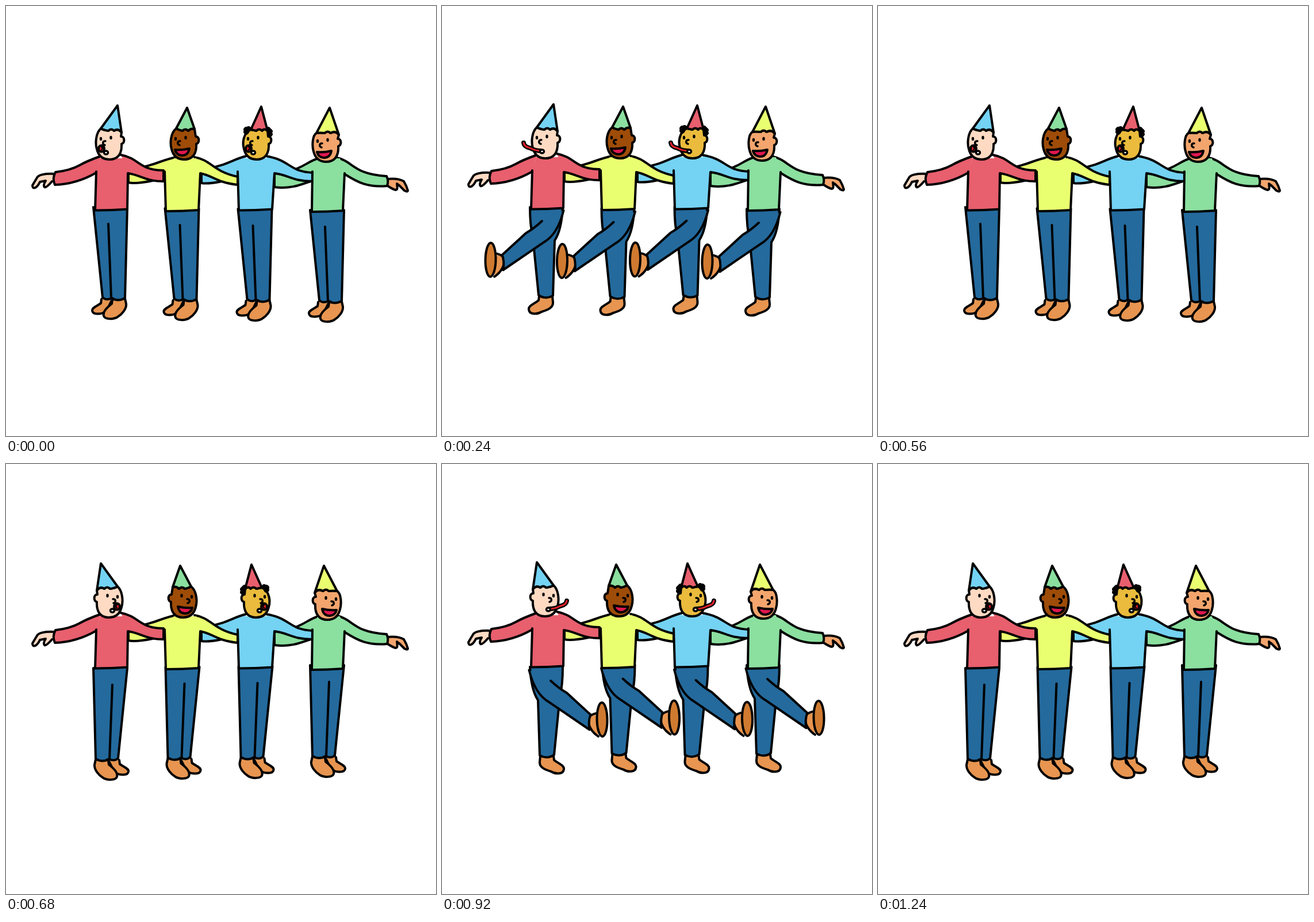
An HTML page that plays this animation: 748 by 748 pixels, repeating every 1.36 s.

```html
<!DOCTYPE html>
<html lang="en">
<head>
<meta charset="utf-8">
<title>Party kick line</title>
<style>
  html, body { margin: 0; width: 100%; height: 100%; overflow: hidden; background: #fff; }
  svg { display: block; width: 100%; height: 100%; }
</style>
</head>
<body>
<svg id="stage" viewBox="0 0 748 748" fill="none" stroke="#000" stroke-width="4" stroke-linecap="round" stroke-linejoin="round"></svg>
<script>
const RED = '#e85f6e', YELLOW = '#eaff70', BLUE = '#74d2f3', GREEN = '#8bdf9f';
const PANTS = '#246a9d', SHOE = '#e79550', SOLE = '#cf7a30';

// trunk: left x at armpit and hem, right x at hem and armpit
// hat: left base, tip and right base, relative to the head centre
// legs: x offset, y offset standing, y offset kicking
const dancers = [
  { shirt: RED, skin: '#ffdac3', hatColor: BLUE, blower: true,
    head: [180, 239], axis: 179.5, hat: [-15, -28, 14, -68, 21, -21],
    trunk: [157, 155, 211, 212], hem: 352.5, neck: [164, 206],
    left: 'M165 259Q140 268 128 275Q112 284 86 287Q80 298 85 309Q122 308 157 288',
    right: 'M200 257C232 263 232 284 274 284V303C242 303 232 291 212 289',
    legs: [0, 0, 0] },
  { shirt: YELLOW, skin: '#9e4c08', hatColor: GREEN,
    head: [310, 239], axis: 309, hat: [-14, -28, 5, -64, 18, -27],
    trunk: [276, 278, 335, 338], hem: 354, neck: [292, 331],
    left: 'M296 261C262 268 262 276 213 282V305Q228 309 276 297',
    right: 'M328 261C358 266 358 285 403 295V309C366 305 360 293 338 289',
    legs: [124.5, 2, 2] },
  { shirt: BLUE, skin: '#eabb3c', hatColor: RED, blower: true, tufts: true,
    head: [436, 239], axis: 435.5, hat: [-10, -26, 8, -66, 19, -24],
    trunk: [403, 405, 463, 467], hem: 352.5, neck: [416, 457],
    left: 'M418 259C390 266 386 276 340 282V306Q358 309 403 296',
    right: 'M452 259C495 266 492 286 533 288V303C498 303 490 291 467 289',
    legs: [251.5, 3, -0.5] },
  { shirt: GREEN, skin: '#f3a56d', hatColor: YELLOW,
    head: [557, 243], axis: 558, hat: [-17, -24, 6, -68, 22, -21],
    trunk: [533, 532, 586, 589], hem: 355, neck: [542, 581],
    left: 'M546 262C518 270 522 282 467 290V313C495 317 515 308 533 302',
    right: 'M576 262C604 268 604 291 662 294Q666 302 663 311C630 314 612 305 590 291',
    legs: [377, 5, 3] }
];

const path = (d, fill = 'none', extra = '') => `<path d="${d}" fill="${fill}" ${extra}/>`;
const group = (transform, content) => `<g transform="${transform}">${content}</g>`;
const dot = (x, y, rx, ry, fill, extra = '') =>
  `<ellipse cx="${x}" cy="${y}" rx="${rx}" ry="${ry}" fill="${fill}" ${extra}/>`;

function standingLegs() {
  return path('M166 510L165 517C158 522 149 525 150 530C151 538 166 536 174 532L184 512', SHOE) +
    path('M185 511L184 518C176 524 168 532 170 539C172 546 188 545 194 541C201 537 210 527 209 518L207 509', SHOE) +
    path('M152 350L168 507Q175 513 184 508Q195 515 207 508L211 350', PANTS) +
    path('M178 379L183 508');
}

function kickingLegs(angle) {
  const support =
    path('M169 505L168 512C161 518 150 521 151 528C152 538 167 536 173 532C183 529 194 525 193 515L192 505', SHOE) +
    path('M153 350Q153 382 158 402L168 503Q180 511 193 504L196 408Q208 390 210 350', PANTS);
  const kicker =
    path('M116 453Q125 453 131 458Q135 478 121 493', SHOE) +
    path('M178 379Q167 396 156 406L125 453Q132 463 133 478L191 413Q210 394 210 352', PANTS) +
    dot(107.5, 466, 9, 29.5, SOLE, 'transform="rotate(-13 107.5 466)"');
  return support + group(`rotate(${angle} 196 360)`, kicker);
}

function trunk({ trunk: [armL, hemL, hemR, armR], hem, neck, shirt, right }) {
  const outline = `M${armL} 286L${hemL} ${hem + 1}Q${(hemL + hemR) / 2} ${hem + 1} ${hemR} ${hem - 1}L${armR} 289`;
  return path(right, shirt) +
    path(`${outline}L${neck[1]} 263H${neck[0]}Z`, shirt, 'stroke="none"') + path(outline);
}

function mouth(blower, kicking) {
  if (!blower) return path('M-16 9Q-4 10 9 7Q7 19 -4 19Q-14 18 -16 9Z', '#e0174f');
  const tube = 'M-8 13Q-17 13 -27 8Q-37 6 -38 -1';
  const toy = kicking
    ? path(tube, 'none', 'stroke-width="8"') + path(tube, 'none', 'stroke="#e3202b" stroke-width="3"')
    : dot(-14, 7, 5, 5.5, '#e3202b') + path('M-14 4Q-10 7 -14 9', 'none', 'stroke-width="2.5"');
  return toy + dot(-6, 14, 3.5, 3, '#fff', 'stroke-width="3.5"');
}

function head(d, mirrored, kicking) {
  const [x1, y1, tipX, tipY, x2, y2] = d.hat, mid = (x1 + x2) / 2;
  const fringe = `Q${x2 - 6} -29 ${mid + 5} -24Q${mid} -29 ${mid - 5} -24Q${x1 + 5} -25 ${x1} ${y1}`;
  const tufts = d.tufts
    ? [[-18, -26], [-14, -27], [-18, -22], [20, -26], [23, -23], [23, -18]]
        .map(([x, y]) => dot(x, y, 4.5, 4.5, '#000', 'stroke-width="1"')).join('') : '';
  const face = `M${x1} ${y1}C-24 -20 -25 -2 -22 8C-19 20 -11 26 0 26C13 26 22 18 21 -1` +
    `C27 -3 27 -14 20 -14L${x2} ${y2}`;
  const [cx, cy] = d.head;
  return group(`translate(${mirrored ? 2 * d.axis - cx : cx} ${cy}) scale(${mirrored ? -1 : 1} 1)`,
    path(face + fringe, d.skin) + tufts +
    path(`M${x1} ${y1}L${tipX} ${tipY}L${x2} ${y2}${fringe}Z`, d.hatColor) +
    dot(-15, -10, 2.2, 3.2, '#000', 'stroke="none"') + dot(2.5, -12, 2.2, 3.2, '#000', 'stroke="none"') +
    path('M-7 -6C-12 -7 -13 0 -8 1', 'none', 'stroke-width="3.5"') + mouth(d.blower, kicking));
}

const hands =
  path('M84 290Q62 289 55 295Q50 303 46 310Q46 316 51 314Q56 311 59 304L69 302Q64 310 67 313Q70 315 80 303', dancers[0].skin) +
  path('M663 299Q682 297 692 303Q697 311 699 319Q698 322 693 319L684 310L680 307Q682 318 678 318Q673 317 664 311', dancers[3].skin);

function drawPose({ mirrored, kick }) {
  const kicking = kick !== null;
  const each = draw => dancers.map(draw).join('');
  const legs = kicking ? kickingLegs(kick) : standingLegs();
  const lower = each(({ legs: [x, standY, kickY] }) =>
    group(`translate(${x} ${kicking ? kickY : standY})`, legs));
  const upper = hands + each(d => path(d.left, d.shirt)) + each(trunk) +
    each(d => head(d, mirrored, kicking));
  return group(mirrored ? 'translate(740 0) scale(-1 1)' : '', lower) +
    group(`translate(0 ${kicking ? 0 : 2})`, upper);
}

// One side of the dance: end time in ms and leg angle (null = standing)
const HALF = 680;
const steps = [[160, null], [240, 0], [400, 14], [480, 0], [560, -12], [HALF, null]];
const pictures = [false, true].map(mirrored =>
  steps.map(([, kick]) => drawPose({ mirrored, kick })));

const stage = document.getElementById('stage');
let shown = '';
function render(now) {
  const time = now % (2 * HALF);
  const side = time < HALF ? 0 : 1;
  const step = steps.findIndex(([end]) => time - side * HALF < end);
  const picture = pictures[side][step];
  if (picture !== shown) stage.innerHTML = shown = picture;
}

const start = performance.now();
function tick() {
  render(performance.now() - start);
  requestAnimationFrame(tick);
}
tick();
</script>
</body>
</html>
```
